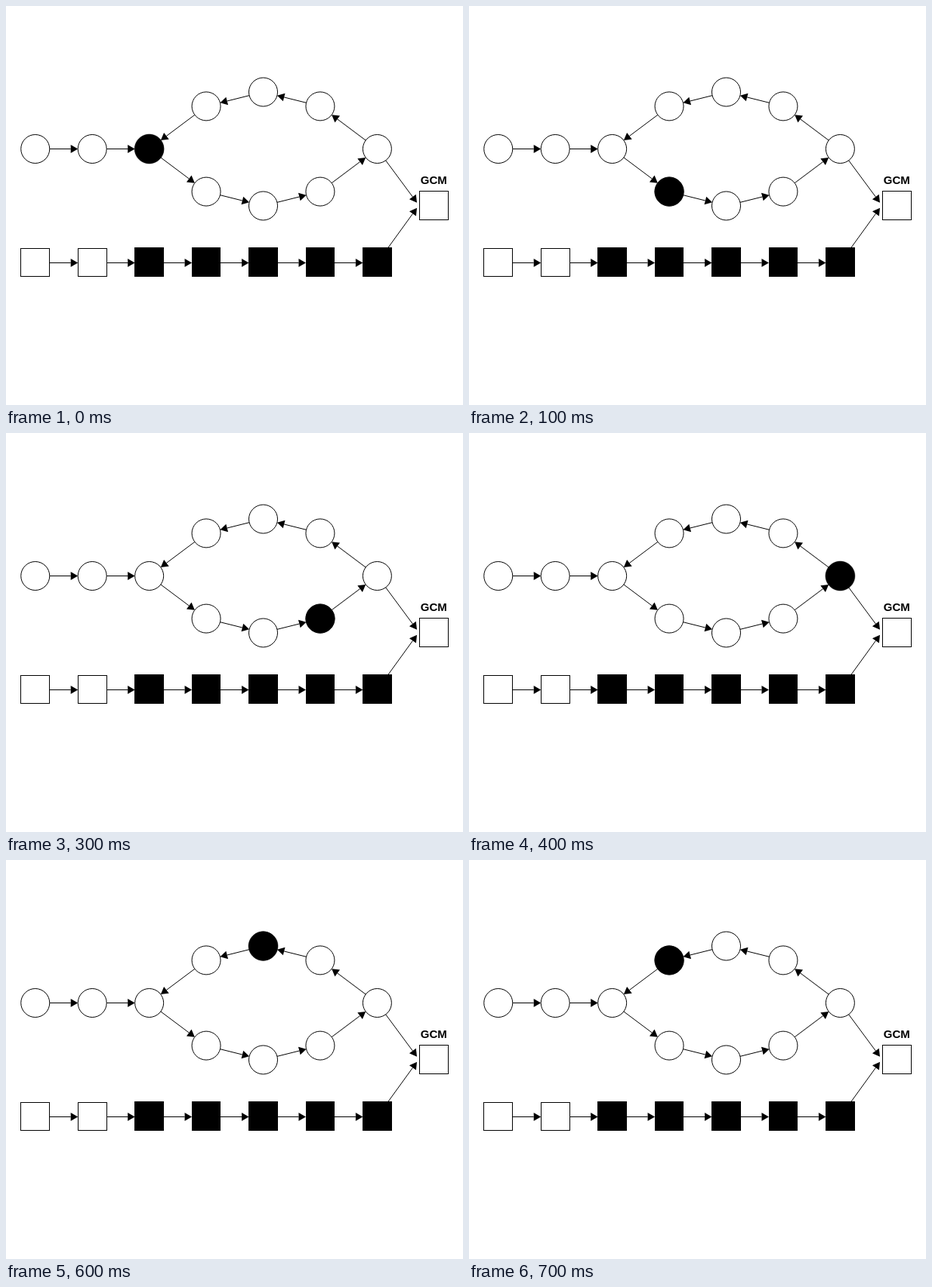
Animation of 605x529 px, one loop 800 ms. Source, as an HTML page:

```html
<!DOCTYPE html>
<html lang="en">
<head>
<meta charset="utf-8">
<title>Cycle and chain</title>
<style>
html, body { margin: 0; width: 100%; height: 100%; overflow: hidden; background: #fff; }
svg { display: block; width: 605px; height: 529px; }
.node { fill: #fff; stroke: #000; stroke-width: 1; }
.on { fill: #000; }
.wire { stroke: #000; stroke-width: 1; }
text { font: bold 15px "Liberation Sans", Arial, sans-serif; }
</style>
</head>
<body>
<svg id="stage" viewBox="0 0 605 529"></svg>
<script>
const stage = document.getElementById('stage');
const LOOP = 800;
const UNIT = 18.86;
const R = 19;
const MID = 189.5;
const CHAIN = 340.5;
const GOAL = { x: 566.7, y: 264.7 };

const col = i => 38.75 + i * 4 * UNIT;
const snap = v => Math.floor(v) + 0.5;
const at = (x, y) => ({ x, y });

function add(tag, attrs) {
  const el = document.createElementNS('http://www.w3.org/2000/svg', tag);
  for (const key in attrs) el.setAttribute(key, attrs[key]);
  stage.appendChild(el);
  return el;
}

const circle = (p, cls = 'node') => add('circle', { cx: p.x, cy: p.y, r: R, class: cls });

function box(cx, top, bottom, cls = 'node') {
  const x = snap(cx - 18.8);
  return add('rect', { x, y: top, width: snap(cx + 18.9) - x, height: bottom - top, class: cls });
}

// Runs from the rim of node a towards b and stops short of b by gap
function link(a, b, gap = R, start = R) {
  const len = Math.hypot(b.x - a.x, b.y - a.y);
  const ux = (b.x - a.x) / len, uy = (b.y - a.y) / len;
  const along = (d, side = 0) => at(a.x + ux * d - uy * side, a.y + uy * d + ux * side);
  const tip = along(len - gap), base = len - gap - 9.5;
  const from = along(start), to = along(base);
  const left = along(base, -5.5), right = along(base, 5.5);
  add('line', { x1: from.x, y1: from.y, x2: to.x, y2: to.y, class: 'wire' });
  add('path', { d: `M${tip.x} ${tip.y}L${left.x} ${left.y}L${right.x} ${right.y}Z` });
}

const linkAll = nodes => nodes.slice(1).forEach((p, i) => link(nodes[i], p));

// The ring, in the order the token visits it
const ring = Array.from({ length: 8 }, (_, i) =>
  at(col(6 - Math.abs(4 - i)), MID + UNIT * Math.round(4 * Math.sin(i * Math.PI / 4))));
const lead = [at(col(0), MID), at(col(1), MID)];
const chain = Array.from({ length: 7 }, (_, i) => at(col(i), CHAIN));

[...lead, ...ring].forEach(p => circle(p));
chain.forEach((p, i) => {
  const lit = i > 1;
  box(p.x, lit ? 320.5 : 321.5, 358.5, lit ? 'node on' : 'node');
});
box(GOAL.x, 245.5, 283.5);
const goal = box(GOAL.x, 245.5, 283.5, 'node on');
const token = circle(at(0, 0), 'node on');

linkAll([...lead, ...ring, ring[0]]);
linkAll(chain);
link(ring[4], at(544, GOAL.y - 4), 0);
link(chain[6], at(544, GOAL.y + 3), 0, 23.5);

add('text', { x: 566.3, y: 236, 'text-anchor': 'middle' }).textContent = 'GCM';

// Each state holds until the next one
function play(el, states) {
  const frames = states.map((s, i) => ({ ...s, offset: i / states.length, easing: 'steps(1, end)' }));
  frames.push({ ...states[0], offset: 1 });
  el.animate(frames, { duration: LOOP, iterations: Infinity });
}

play(token, ring.map(p => ({ transform: `translate(${p.x}px, ${p.y}px)` })));
play(goal, ring.map((_, i) => ({ opacity: i === 5 ? 1 : 0 })));
</script>
</body>
</html>
```
